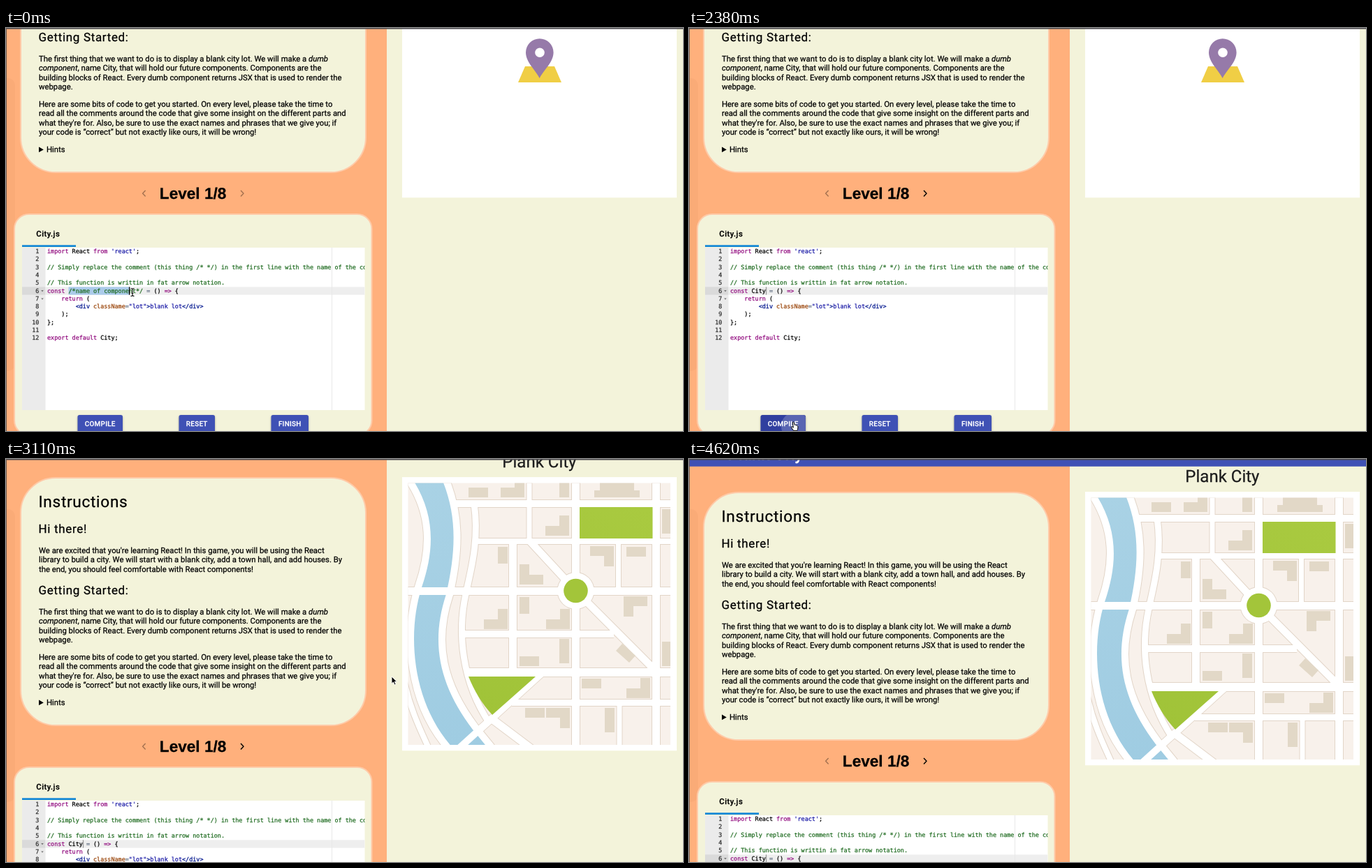
An HTML page with a canvas for the animation above (4720 ms loop, 969x578 px).

```html
<!DOCTYPE html>
<html lang="en">
<head>
<meta charset="utf-8">
<title>Plank City</title>
<style>
html, body { margin: 0; width: 100%; height: 100%; overflow: hidden; background: #f3f3da; }
canvas { display: block; }
</style>
</head>
<body>
<canvas id="stage" width="969" height="578"></canvas>
<script>
const ctx = document.getElementById('stage').getContext('2d');
const W = 969, H = 578, LOOP = 4720;
const TICK = 148; // the screen refreshes once per tick
const ORANGE = '#ffb07c', BEIGE = '#f3f3da', BLUE = '#3f51b5', RIM = '#ffcaa8';
const SANS = 'Roboto, sans-serif';
const MONO = '"DejaVu Sans Mono", monospace';

// Moments, counted in ticks
const TYPE = 7, LEAVE = 10, HOVER = 14, PASS = 15, MAP = 17, SCROLL = 19.4;

const clamp = (v, lo, hi) => Math.min(hi, Math.max(lo, v));
const ease = u => u * u * (3 - 2 * u);

function scrollAt(k) {
  return Math.round(196 * Math.exp(-1.41 * Math.max(0, k - SCROLL)));
}

function pointerAt(k) {
  const legs = [
    [0, 4, 194, 377],
    [LEAVE, HOVER, 151, 571],
    [16, 18, 552, 312],
    [22, 26, 840, 600]
  ];
  let x = 181, y = 379;
  for (const [from, to, tx, ty] of legs) {
    const u = ease(clamp((k - from) / (to - from), 0, 1));
    x += (tx - x) * u;
    y += (ty - y) * u;
  }
  return [x, y];
}

/* ---------- drawing helpers ---------- */

function rect(x, y, w, h, color) {
  ctx.fillStyle = color;
  ctx.fillRect(x, y, w, h);
}

function shape(d, fill, stroke, width = 1) {
  const path = new Path2D(d);
  if (fill) { ctx.fillStyle = fill; ctx.fill(path); }
  if (stroke) { ctx.strokeStyle = stroke; ctx.lineWidth = width; ctx.stroke(path); }
}

function disc(x, y, r, color) {
  ctx.beginPath();
  ctx.arc(x, y, r, 0, 7);
  ctx.fillStyle = color;
  ctx.fill();
}

function card(x, y, w, h, r, fill, border) {
  ctx.beginPath();
  ctx.roundRect(x, y, w, h, r);
  ctx.fillStyle = fill;
  ctx.fill();
  if (border) {
    ctx.strokeStyle = border;
    ctx.lineWidth = 2;
    ctx.stroke();
  }
}

// The hairline stroke gives letters the slightly heavier look of smoothed type.
function text(s, x, y, font, color = '#000', align = 'left', spacing = 0) {
  ctx.font = font;
  ctx.letterSpacing = spacing + 'px';
  ctx.textAlign = align;
  ctx.fillStyle = ctx.strokeStyle = color;
  ctx.lineWidth = 0.25;
  ctx.fillText(s, x, y);
  ctx.strokeText(s, x, y);
  return ctx.measureText(s).width;
}

/* ---------- instructions ---------- */

// Asterisks switch italics on and off.
function paragraph(y, ...lines) {
  lines.forEach((line, i) => {
    let x = 47;
    line.split('*').forEach((run, n) => {
      x += text(run, x, y + i * 13.42, (n % 2 ? 'italic ' : '') + '11.3px ' + SANS);
    });
  });
}

function heading(s, y, size) {
  text(s, 46.5, y, size + 'px ' + SANS, '#000', 'left', 0.7);
}

function drawInstructions() {
  card(21, 48, 494, 355, 50, BEIGE, RIM);
  heading('Instructions', 90, 22.6);
  heading('Hi there!', 127, 16.95);
  paragraph(156,
    'We are excited that you\'re learning React! In this game, you will be using the React',
    'library to build a city. We will start with a blank city, add a town hall, and add houses. By',
    'the end, you should feel comfortable with React components!');
  heading('Getting Started:', 215, 16.95);
  paragraph(244,
    'The first thing that we want to do is to display a blank city lot. We will make a *dumb*',
    '*component*, name City, that will hold our future components. Components are the',
    'building blocks of React. Every dumb component returns JSX that is used to render the',
    'webpage.');
  paragraph(309,
    'Here are some bits of code to get you started. On every level, please take the time to',
    'read all the comments around the code that give some insight on the different parts and',
    'what they\'re for. Also, be sure to use the exact names and phrases that we give you; if',
    'your code is “correct” but not exactly like ours, it will be wrong!');
  shape('M47 366.6L53.8 370.4L47 374.2Z', '#000');
  text('Hints', 58, 374, '11.3px ' + SANS);
}

function chevron(x, dir, color) {
  shape(`M${x - dir * 2} 429l${dir * 4} 4.2l${-dir * 4} 4.2`, null, color, 1.4);
}

function drawLevel(passed) {
  const off = 'rgba(0,0,0,.36)';
  text('Level 1/8', 267.6, 441, 'bold 22.6px "Liberation Sans", Arial, sans-serif', '#000', 'center');
  chevron(197.6, -1, off);
  chevron(338, 1, passed ? '#000' : off);
}

/* ---------- editor ---------- */

const CELL = 5.085, ROW = 11.28, X0 = 59, TOP = 511;
const ink = {
  k: '#930f80', s: '#1a1aa6', c: '#236e24', o: '#687687', t: '#00168e', a: '#994409', x: '#000'
};

// Each run is "ink:text".
function source(name) {
  return [
    ['k:import', 'x: React ', 'k:from', 's: \'react\'', 'x:;'],
    [],
    ['c:// Simply replace the comment (this thing /* */) in the first line with the name of the component'],
    [],
    ['c:// This function is writtin in fat arrow notation.'],
    ['k:const ', name, 'o: = ', 'x:() ', 'k:=>', 'x: {'],
    ['k:    return', 'x: ('],
    ['t:        <div ', 'a:className', 'o:=', 's:"lot"', 't:>', 's:blank lot', 't:</div>'],
    ['x:    );'],
    ['x:};'],
    [],
    ['k:export default', 'x: City;']
  ];
}

function drawCode(k) {
  const font = '8.45px ' + MONO, rowY = TOP + 5 * ROW, start = X0 + 6 * CELL;
  const typing = k >= TYPE;
  const chars = typing ? clamp(k - TYPE + 1, 1, 4) : 17 + Math.min(k, 4);
  const name = typing ? 'x:' + 'City'.slice(0, chars) : 'c:/*name of component*/';

  ctx.save();
  ctx.beginPath();
  ctx.rect(23, TOP, 490.5, 233);
  ctx.clip();
  rect(23, TOP, 491, 233, '#fff');
  rect(23, TOP, 33.5, 233, '#ebebeb');
  rect(23, rowY, 33.5, ROW, '#dadada');
  rect(56.5, rowY, 457, ROW, '#eee');
  rect(466, TOP, 1, 233, '#e8e8e8');
  if (!typing) rect(start, rowY, chars * CELL, ROW, '#abcbea');

  source(name).forEach((runs, i) => {
    const y = TOP + i * ROW + 8.2;
    let x = X0;
    text(String(i + 1), 47.3, y, font, '#333', 'right');
    for (const run of runs) {
      x += text(run.slice(2), x, y, font, ink[run[0]]);
      if (run.endsWith('{') || run.endsWith('return')) shape(`M50.2 ${y - 3.5}h3.6l-1.8 2.4Z`, '#777');
    }
  });
  rect(start + chars * CELL, rowY, 1.3, ROW, k >= PASS ? '#999' : '#000');
  ctx.restore();
}

function button(s, x, w, wave = 0) {
  ctx.save();
  ctx.shadowColor = 'rgba(0,0,0,.35)';
  ctx.shadowBlur = 3;
  ctx.shadowOffsetY = 1.5;
  card(x, 751, w, 25.4, 2.8, wave ? '#303f9f' : BLUE);
  ctx.restore();
  ctx.save();
  ctx.clip();
  disc(152, 767, Math.max(0, wave - 1), 'rgba(255,255,255,.2)');
  ctx.restore();
  text(s, x + w / 2, 767.3, '500 9.88px ' + SANS, '#fff', 'center', 0.28);
}

function drawEditor(k) {
  card(12, 463, 511.5, 317, 21, BEIGE, RIM);
  text('City.js', 43.3, 495.4, '500 11.3px ' + SANS, '#000', 'left', 0.5);
  rect(23, 507.3, 77, 2.7, '#1287d6');
  drawCode(k);
  const hover = k >= HOVER && k < MAP;
  button('COMPILE', 102.5, 64.5, hover ? 1 + 10 * (k - HOVER) : 0);
  button('RESET', 247.5, 51.5);
  button('FINISH', 379.5, 53.5);
}

/* ---------- city view ---------- */

const LAND = '#f8f1eb', EDGE = '#e2d5c8', HOUSE = '#e2d8c7';
const RIVER = 'M582 50C614 100 614 150 595 205C574 270 580 370 640 436H690' +
  'L668 409C620 345 607 285 630 215C645 150 645 100 624 50Z';

// [width, path]; the first two cross the river
const roads = [
  [11, 'M570 210.5H960'],
  [10, 'M768 327L645 439'],
  [10, 'M640 85H960'],
  [8, 'M668 139H960'],
  [10, 'M654 272H870'],
  [12, 'M658 327H960'],
  [9, 'M724 370.5H960'],
  [11, 'M815.5 50V440M930.5 50V440M725.5 139V327'],
  [7, 'M749 50V139M876.5 139V210M878 370V440'],
  [10.5, 'M750 139L815.5 210L931 326'],
  [11, 'M697 395L754 438'],
  [9, 'M670 85C678 140 664 185 658 215C646 270 652 340 692 400'],
  [8, 'M570 340C580 385 596 415 606 438']
];

function pave(color, grow) {
  for (const [w, d] of roads) shape(d, null, color, w + grow);
  shape(RIVER, null, color, 20 + grow);
  disc(815.5, 210, 26 + grow / 2, color);
}

// An angled building: its corner, and the way its two wings run.
function angled(x, y, dx, dy) {
  shape(`M${x} ${y}h${dx * 34}v${dy * 14}h${-dx * 20}v${dy * 15}h${-dx * 14}Z`, HOUSE);
}

function drawHouses() {
  angled(742, 76, -1, -1);
  angled(806, 131, -1, -1);
  angled(735, 201, 1, -1);
  angled(870, 146, -1, 1);
  angled(718, 265, -1, -1);
  angled(807, 265, -1, -1);
  angled(884, 218, 1, 1);
  angled(922, 364, -1, -1);
  angled(807, 378, -1, 1);
  const wide = 'h28v14h-28Z', tall = 'h14v35h-14Z', short = 'h14v24h-14Z';
  shape(`M662 62${wide}M735 304${wide}M824 336${wide}M743 378${wide}M888 147${wide}`, HOUSE);
  shape(`M939 93${tall}M792 279${tall}M939 283${tall}M857 378${tall}`, HOUSE);
  shape(`M792 52${short}M704 147${short}M735 219${short}M842 66h8v-11h49v11h8v10h-65Z`, HOUSE);
  shape('M882 286L901 303L892 313L873 296Z', HOUSE);
}

function drawMap() {
  ctx.save();
  ctx.beginPath();
  ctx.rect(575.5, 55.5, 375.5, 375.5);
  ctx.clip();
  rect(567, 47, 393, 393, LAND);
  pave(EDGE, 2);
  pave('#fff', 0);
  drawHouses();

  const water = ctx.createLinearGradient(580, 55, 660, 431);
  water.addColorStop(0, '#a9d2e5');
  water.addColorStop(1, '#9fcce2');
  shape(RIVER, water);
  for (const [w, d] of roads.slice(0, 2)) shape(d, null, '#fff', w);

  const grass = ctx.createLinearGradient(660, 388, 925, 90);
  grass.addColorStop(0, '#a0c338');
  grass.addColorStop(1, '#a9ca40');
  shape('M821 90H925.5V135H821Z', grass);
  shape('M662 333H758L696 388C681 372 670 353 662 333Z', grass);
  disc(815.5, 210, 17.3, '#a3c53a');
  ctx.restore();
}

function drawPin() {
  shape('M743 251H785L795 274H733Z', '#f0ce45');
  shape('M763.7 268C757 255 744 245 744 231A19.8 19.8 0 0 1 783.6 231C783.6 245 770.5 255 763.7 268Z', '#967aa9');
  disc(764, 231.3, 6.8, '#fff');
}

function drawCity(k) {
  text('Plank City', 763.4, 33, '24px ' + SANS, '#1c1c1c', 'center');
  rect(567, 47, 393, 392.3, '#fff');
  if (k < MAP) drawPin();
  else drawMap();
}

/* ---------- pointer ---------- */

function drawPointer(k) {
  const [x, y] = pointerAt(k);
  ctx.save();
  ctx.translate(x, y);
  if (k >= HOVER && k < MAP) {
    shape('M-2.6 -5.5Q-1.6 -6.6 -.8 -5.4L.2 -1.7Q1.6 -2.4 2.2 -1.2Q3.4 -1.6 3.8 -.5Q5 -.4 5 1L4.6 4.6L3.6 6.6H-1.2L-4.3 2.4Q-5 .8 -3.4 .9L-1.7 2.1Z', '#fff', '#000');
  } else if (k < HOVER && y < 547) {
    const beam = 'M-2.5 -5.5Q0 -5.5 0 -4Q0 -5.5 2.5 -5.5M0 -4V4M-2.5 5.5Q0 5.5 0 4Q0 5.5 2.5 5.5M-1.3 1.5H1.3';
    shape(beam, null, '#fff', 2.2);
    shape(beam, null, '#000', 1.1);
  } else {
    shape('M0 0V10.2L2.4 8L4.2 12L6 11.2L4.3 7.3H7.5Z', '#000', '#fff', 0.9);
  }
  ctx.restore();
}

function draw(t) {
  const k = Math.floor(t / TICK);
  ctx.textRendering = 'geometricPrecision';
  ctx.lineJoin = 'round';
  rect(0, 0, W, H, BEIGE);
  rect(0, 0, 545, H, ORANGE);
  card(-10, 72, 23, 420, 10, 'rgba(120,60,20,.04)');

  ctx.save();
  ctx.translate(0, -scrollAt(k));
  drawInstructions();
  drawLevel(k >= PASS);
  drawEditor(k);
  drawCity(k);
  rect(0, -36, W, 46.7, BLUE);
  text('Plank City', 163, 0.6, '500 24px ' + SANS, '#fff', 'right');
  ctx.restore();

  rect(0, 0, W, 1.5, '#4c4b4f');
  rect(0, 0, 1, H, '#6b5a50');
  drawPointer(k);
}

const begin = performance.now();
function tick() {
  draw((performance.now() - begin) % LOOP);
  requestAnimationFrame(tick);
}
tick();
</script>
</body>
</html>
```
